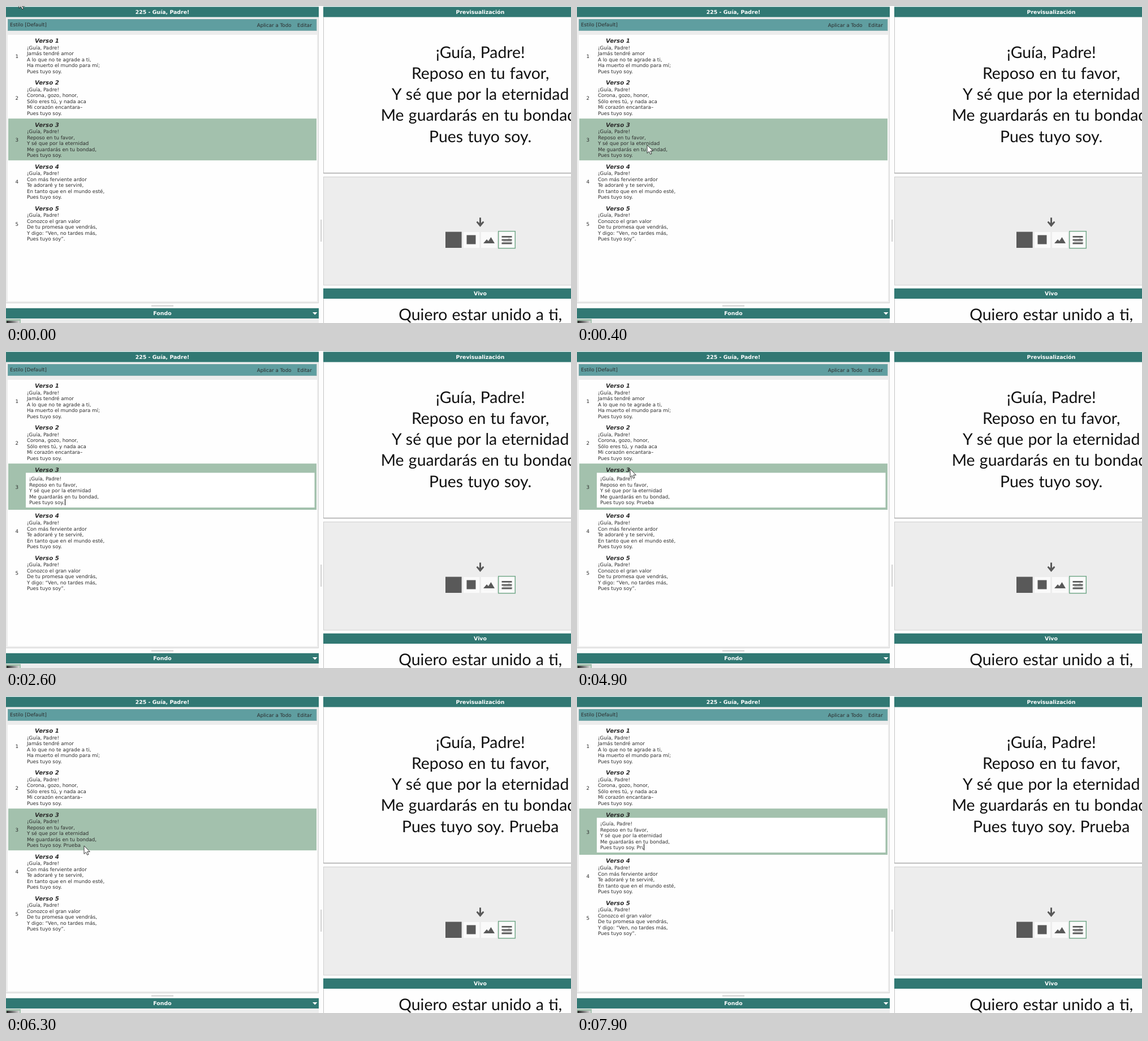
An HTML page for the animation above (8000 ms loop, 999 px wide and 561 px high).

```html
<!DOCTYPE html>
<html lang="es">
<head>
<meta charset="utf-8">
<title>Editor de versos</title>
<style>
html, body { margin: 0; width: 100%; height: 100%; overflow: hidden; background: #fdfdfd; }
svg { display: block; width: 100%; height: 100%; }
text { font: 8.7px "DejaVu Sans", sans-serif; fill: #2b2b2b; white-space: pre; text-rendering: geometricPrecision; }
.mid { text-anchor: middle; }
.head { font-size: 9.4px; font-weight: bold; fill: #fff; text-anchor: middle; }
.title { font-size: 10.2px; font-weight: bold; font-style: oblique; }
.slide { font: 28.4px Lato, sans-serif; word-spacing: 1px; fill: #111; text-anchor: middle; }
</style>
</head>
<body>
<svg id="stage" viewBox="0 0 999 561" preserveAspectRatio="none"></svg>
<script>
const LOOP = 8000, PITCH = 74.15, LINE = 10.5, GROW = 7.8;
const TEAL = '#317873', SAGE = '#a3c1ad', PALE = '#ededed', DARK = '#595959';
const TITLE = 'Guía, Padre!';
const LAST = 'Pues tuyo soy.';
const verses = [
  ['Jamás tendré amor', 'A lo que no te agrade a ti,', 'Ha muerto el mundo para mí;', LAST],
  ['Corona, gozo, honor,', 'Sólo eres tú, y nada aca', 'Mi corazón encantara–', LAST],
  ['Reposo en tu favor,', 'Y sé que por la eternidad', 'Me guardarás en tu bondad,', LAST],
  ['Con más ferviente ardor', 'Te adoraré y te serviré,', 'En tanto que en el mundo esté,', LAST],
  ['Conozco el gran valor', 'De tu promesa que vendrás,', 'Y digo: “Ven, no tardes más,', 'Pues tuyo soy”.']
].map(lines => ['¡' + TITLE, ...lines]);

const rect = (x, y, w, h, fill, more = '') =>
  `<rect x="${x}" y="${y}" width="${w}" height="${h}" fill="${fill}" ${more}/>`;
const text = (x, y, s, cls = '', id = '') =>
  `<text x="${x}" y="${y}" class="${cls}" id="${id}">${s}</text>`;
const header = (x, y, w, cx, s) => rect(x, y, w, 18.2, TEAL) + text(cx, y + 12.6, s, 'head');

function row(lines, i) {
  const top = 51 + PITCH * i;
  const body = lines.map((s, n) =>
    text(37, top + 25.8 + LINE * n, s, '', i === 2 && n === 4 ? 'typed' : '')).join('');
  return `<g id="row${i}">` + text(51, top + 14.2, 'Verso ' + (i + 1), 'title') +
    `<g id="num${i}">${text(19.3, top + 41, i + 1, 'mid')}</g><g id="body${i}">${body}</g></g>`;
}

const leftPanel =
  header(0, 1.4, 553, 276.5, '225 - ' + TITLE) +
  rect(0, 20, 553, 506, PALE) + rect(0, 525, 553, 1, '#d2d2d2') + rect(552, 20, 1, 506, '#d9d9d9') +
  rect(3.5, 23.5, 545.5, 20, '#5f9ea0', 'stroke="#7fabab"') +
  text(7, 35.6, 'Estilo [Default]') + text(443.7, 37, 'Aplicar a Todo') + text(515, 37, 'Editar') +
  rect(3, 51, 547, 471.5, '#fefefe') +
  rect(4, 199.2, 545, 74, SAGE, 'id="band"') +
  rect(35, 215.5, 510.5, 61.5, '#fff', 'id="box"') +
  verses.map(row).join('') +
  rect(0, 262, 1, 11, '#000', 'id="caret" shape-rendering="crispEdges"') +
  rect(257, 530, 39, 1.3, '#bbb') + rect(556.5, 378, 1.3, 39, '#bbb') +
  header(0, 534.8, 553, 276.5, 'Fondo') +
  '<path d="M542 542H550.5L546.2 546.5Z" fill="#fff"/>' +
  rect(0, 553, 553, 8, PALE) + rect(0, 554, 26, 7, SAGE) + rect(1, 557, 23, 4, 'url(#thumb)');

const preview = verses[2].map((s, n) =>
  text(838.7, 91.5 + 37.3 * n, s, 'slide', n === 4 ? 'shown' : '')).join('');

const bars = [407, 412.7, 418.7].map(y => rect(876.5, y, 18, 2.7, DARK)).join('');
const hills = 'L6 5 9 8 13.5 1 20 12Z';
const rightPanel =
  header(561, 1.4, 438, 838.5, 'Previsualización') +
  rect(561, 20, 1, 276, '#c4c4c4') + rect(562, 20, 437, 275, '#fefefe') +
  rect(561, 295, 438, 1.4, '#a5a5a5') + preview +
  rect(561.5, 302.5, 440, 191.5, PALE, 'stroke="#d0d0d0"') +
  `<path d="M837 374.5H840V384L843.6 380.8 845.4 382.8 838.5 391 831.6 382.8 833.4 380.8 837 384Z" fill="${DARK}"/>` +
  rect(777, 399.6, 28.6, 28.4, DARK) +
  rect(809, 400, 28, 28, '#fafafa') + rect(814.5, 405.5, 16, 16, DARK) +
  rect(840, 400, 28, 28, '#fafafa') +
  `<path transform="translate(844 408)" d="M0 12${hills}" fill="${DARK}"/>` +
  rect(870.7, 398.7, 29.6, 30, '#fafafa', 'stroke="#74a98a" stroke-width="1.5"') +
  `<path transform="translate(876 408)" d="M0 12${hills}" fill="#d2d2d2"/>` + bars +
  header(561, 499.8, 438, 838.5, 'Vivo') +
  rect(561, 518, 1, 43, '#c4c4c4') + rect(562, 518, 437, 43, '#fefefe') +
  text(838.7, 556, 'Quiero estar unido a ti,', 'slide');

const pointer = '<path id="pointer" d="M0 0V14.5L3.4 11.4 5.7 16.4 8 15.4 5.8 10.6H10.3Z" ' +
  'fill="#fff" stroke="#222" stroke-width=".9"/>';

const stage = document.getElementById('stage');
stage.innerHTML = '<defs><linearGradient id="thumb"><stop stop-color="#222"/>' +
  '<stop offset="1" stop-color="#ddd"/></linearGradient></defs>' + leftPanel + rightPanel + pointer;

const $ = id => document.getElementById(id);
const show = (el, on) => el.setAttribute('visibility', on ? 'visible' : 'hidden');
const move = (id, x, y) => $(id).setAttribute('transform', `translate(${x} ${y})`);

// time, editing, typed suffix, caret place
const steps = [
  [0, 0, '', ''], [600, 1, '', 'click'], [1500, 1, '', ''],
  [1700, 1, '', 'end'], [2200, 1, '', ''], [2600, 1, ' ', 'end'],
  [3100, 1, ' P', 'end'], [3300, 1, ' Pr', 'end'], [3400, 1, ' Pru', 'end'],
  [3500, 1, ' Prue', 'end'], [3600, 1, ' Prueb', 'end'], [3900, 1, ' Prueba', 'end'],
  [4500, 1, ' Prueba', ''], [5100, 0, ' Prueba', ''],
  [6500, 1, ' Prueba', 'inside'], [7000, 1, ' Prueba', 'end'], [7600, 1, ' Prueba', ''],
  [7700, 1, ' Prueb', 'end'], [7800, 1, ' Prue', 'end'], [7900, 1, ' Pru', 'end']
];

// each run of the pointer: from, until, then points of time, x, y
const runs = [
  [0, 900, [[0, 23, -10.5], [200, 23, -10.5], [400, 124, 246], [600, 118, 253], [900, 118, 253]]],
  [4500, 6600, [[4500, 139, 256], [4900, 94, 209], [6000, 94, 209], [6300, 138, 265], [6600, 138, 265]]]
];

function along(points, t) {
  const i = Math.max(1, points.findIndex(p => p[0] >= t));
  const [t0, x0, y0] = points[i - 1], [t1, x1, y1] = points[i];
  const k = (t - t0) / (t1 - t0);
  return [x0 + (x1 - x0) * k, y0 + (y1 - y0) * k];
}

function placeCaret(place) {
  show($('caret'), place);
  if (!place) return;
  const typed = $('typed'), n = typed.textContent.length - (place === 'inside' ? 1 : 0);
  const x = place === 'click' ? 117 : Math.round(40.5 + typed.getSubStringLength(0, n)) - 1;
  $('caret').setAttribute('x', x);
  $('caret').setAttribute('y', place === 'click' ? 251.5 : 262);
}

function draw(ms) {
  const t = Math.floor(ms / 100) * 100;
  const [, editing, suffix, caret] = steps.filter(s => s[0] <= t).pop();
  $('band').setAttribute('height', editing ? 74 + GROW : 74);
  show($('box'), editing);
  $('typed').textContent = LAST + suffix;
  $('shown').textContent = LAST + (t >= 5100 ? ' Prueba' : '');
  move('num2', 0, editing ? 4 : 0);
  move('body2', editing ? 4 : 0, editing ? 4 : 0);
  for (const id of ['row3', 'row4']) move(id, 0, editing ? GROW : 0);
  placeCaret(caret);

  const run = runs.find(r => t >= r[0] && t < r[1]);
  show($('pointer'), run);
  if (run) move('pointer', ...along(run[2], t));
}

const start = performance.now();
function tick() {
  draw((performance.now() - start) % LOOP);
  requestAnimationFrame(tick);
}
tick();
</script>
</body>
</html>
```
